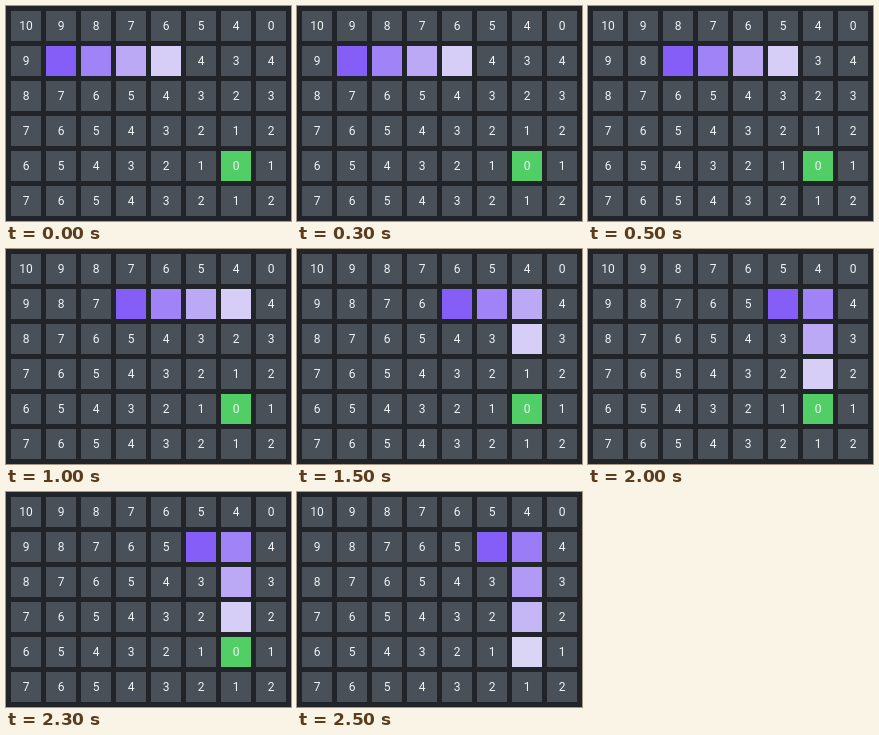
Recreate the animation shown at these times as an HTML page. Size 285 by 215 pixels, loop 3000 ms.

```html
<!DOCTYPE html>
<html lang="en">
<head>
<meta charset="utf-8">
<title>Snake path</title>
<style>
  html, body {
    margin: 0;
    width: 100%;
    height: 100%;
    overflow: hidden;
    background: #212529;
  }
  #grid {
    position: absolute;
    left: 5px;
    top: 5px;
    display: grid;
    grid-template: repeat(6, 30px) / repeat(8, 30px);
    gap: 5px;
    font: 12px/30px Roboto, sans-serif;
    text-align: center;
    color: #f1f3f5;
  }
  #grid div { background: #495057; }
  #grid .goal { background: #51cf66; }
</style>
</head>
<body>
<div id="grid"></div>
<script>
const COLS = 8, ROWS = 6, STEP = 500, STEPS = 6;
const goal = { x: 6, y: 4 };
const violet = [132, 94, 247], pale = [241, 243, 245];
const grid = document.getElementById('grid');
const cells = [];

// Distance to the goal; the top right corner was never visited.
const distance = (x, y) =>
  x === COLS - 1 && y === 0 ? 0 : Math.abs(goal.x - x) + Math.abs(goal.y - y);

for (let y = 0; y < ROWS; y++) {
  for (let x = 0; x < COLS; x++) {
    const el = document.createElement('div');
    const label = String(distance(x, y));
    el.textContent = label;
    if (x === goal.x && y === goal.y) el.className = 'goal';
    grid.append(el);
    cells.push({ el, label });
  }
}

// Right along the second row, then down to the goal.
const pathCell = i => {
  const x = Math.min(1 + i, goal.x);
  const y = 1 + Math.max(0, i - 5);
  return y * COLS + x;
};

const shade = k =>
  `rgb(${violet.map((v, i) => Math.round(v + (pale[i] - v) * k)).join(',')})`;

function draw(step) {
  const tail = Math.min(step, 4);
  const length = step + 4 - tail;
  const body = new Map();
  for (let i = 0; i < length; i++) body.set(pathCell(tail + i), shade(i / length));
  cells.forEach(({ el, label }, i) => {
    el.style.background = body.get(i) || '';
    el.textContent = body.has(i) ? '' : label;
  });
}

let start, shown = 0;
function tick(now) {
  start ??= now;
  const step = Math.floor(Math.max(0, now - start) / STEP) % STEPS;
  if (step !== shown) draw(shown = step);
  requestAnimationFrame(tick);
}

draw(0);
requestAnimationFrame(tick);
</script>
</body>
</html>
```
